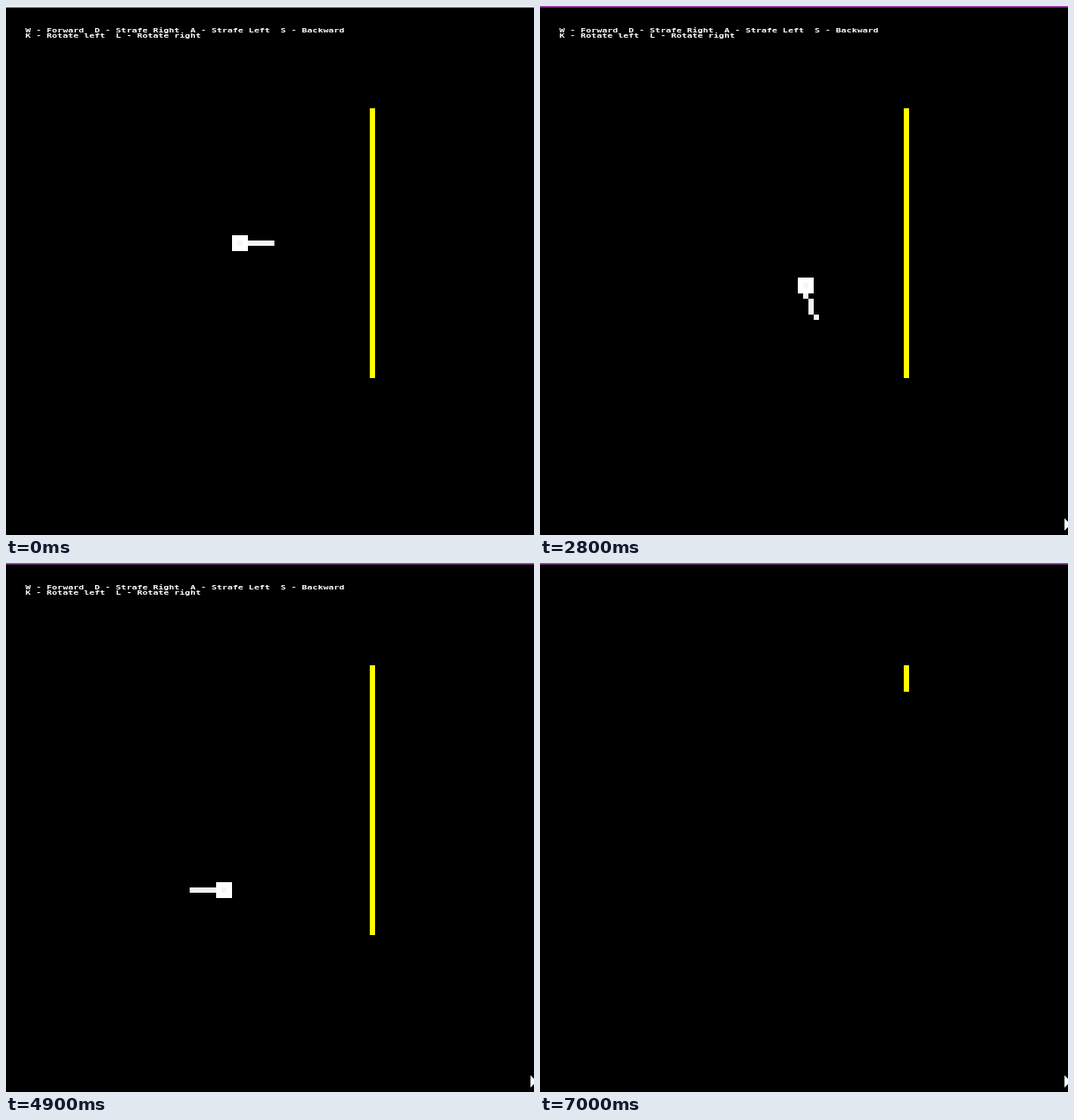
These frames come from a looping animation (598 by 600 pixels, 7.1 s). An HTML page with a canvas:

```html
<!DOCTYPE html>
<html lang="en">
<head>
<meta charset="utf-8">
<title>Top-down walker</title>
<style>
html, body { margin: 0; width: 100%; height: 100%; overflow: hidden; background: #000; }
canvas { position: absolute; left: 0; top: 0; display: block; }
#help {
  position: absolute; left: 22px; top: 25px; margin: 0;
  font: bold 10px/8.333px "DejaVu Sans Mono", monospace; color: #fff;
  white-space: pre; transform: scaleY(.72); transform-origin: 0 0;
}
</style>
</head>
<body>
<canvas id="stage" width="598" height="600"></canvas>
<pre id="help">W - Forward  D - Strafe Right  A - Strafe Left  S - Backward
K - Rotate left  L - Rotate right</pre>
<script>
const LOOP = 7100, TICK = 100, CELL = 6, REACH = 6.4;
const ORIGIN = { x: 262, y: 266 };
const ctx = document.getElementById('stage').getContext('2d');
const help = document.getElementById('help');

// Key points of the walk; the player moves evenly between them
const path = [
  { at: 10, col: 0, row: 0, deg: 0 },
  { at: 11, col: 2, row: 0, deg: 0 },
  { at: 13, col: 2, row: 0, deg: 0 },
  { at: 17, col: 2, row: 0, deg: 35 },
  { at: 18, col: 2, row: 0, deg: 35 },
  { at: 23, col: 5, row: 3, deg: 45 },
  { at: 33, col: 7, row: 13, deg: 105 },
  { at: 42, col: 0, row: 21, deg: 135 },
  { at: 63, col: -9, row: 9, deg: 270 },
  { at: 71, col: -6, row: 3, deg: 315 }
];

function poseAt(tick) {
  const i = path.findIndex(p => p.at > tick);
  if (i === 0) return path[0];
  const a = path[i - 1], b = path[i];
  const k = (tick - a.at) / (b.at - a.at);
  const mix = key => a[key] + (b[key] - a[key]) * k;
  return { col: Math.round(mix('col')), row: Math.round(mix('row')), deg: mix('deg') };
}

// While walking, the screen is regularly caught half redrawn
function isBlank(tick) {
  const period = 2.7, phase = 43;
  const n = Math.ceil((tick - phase) / period);
  return tick > 18 && Math.floor(phase + n * period) === tick;
}

function rect(color, x, y, w, h) {
  ctx.fillStyle = color;
  ctx.fillRect(x, y, w, h);
}

function cells(color, col, row, w = 1, h = w) {
  rect(color, ORIGIN.x + col * CELL, ORIGIN.y + row * CELL, w * CELL, h * CELL);
}

function drawPlayer({ col, row, deg }) {
  const a = deg * Math.PI / 180;
  const tx = Math.round(REACH * Math.cos(a)), ty = Math.round(REACH * Math.sin(a));
  const hollow = deg > 30 && deg < 60;
  const sx = hollow ? 1 : 0;
  const steps = Math.max(Math.abs(tx - sx), Math.abs(ty));
  cells('#fff', col - 1, row - 1, 3);
  cells(hollow ? '#000' : '#f6f6f6', col, row);
  for (let i = 1; i <= steps; i++) {
    const dx = Math.floor(sx + (tx - sx) * i / steps + 0.3);
    const dy = Math.floor(ty * i / steps + 0.3);
    if (Math.max(Math.abs(dx), Math.abs(dy)) > 1) cells('#f2f2f2', col + dx, row + dy);
  }
}

function drawFrame(started) {
  rect('#000', 0, 0, 598, 600);
  rect(started ? '#a546b0' : '#f4f8f8', 0, 0, 598, 1);
  rect(started ? '#66286e' : '#9a9e9e', 0, 1, 598, 1);
  if (!started) return;
  ctx.fillStyle = '#fff';
  ctx.beginPath();
  ctx.moveTo(594, 581);
  ctx.lineTo(601, 588);
  ctx.lineTo(594, 595);
  ctx.fill();
}

function draw(now) {
  const tick = Math.floor((now % LOOP) / TICK);
  const blank = isBlank(tick);
  drawFrame(tick > 0);
  cells('#ff0', 25, -25, 1, blank ? 5 : 51);
  help.style.visibility = blank ? 'hidden' : 'visible';
  if (!blank) drawPlayer(poseAt(tick));
}

const start = performance.now();
function loop() {
  draw(performance.now() - start);
  requestAnimationFrame(loop);
}
loop();
</script>
</body>
</html>
```
